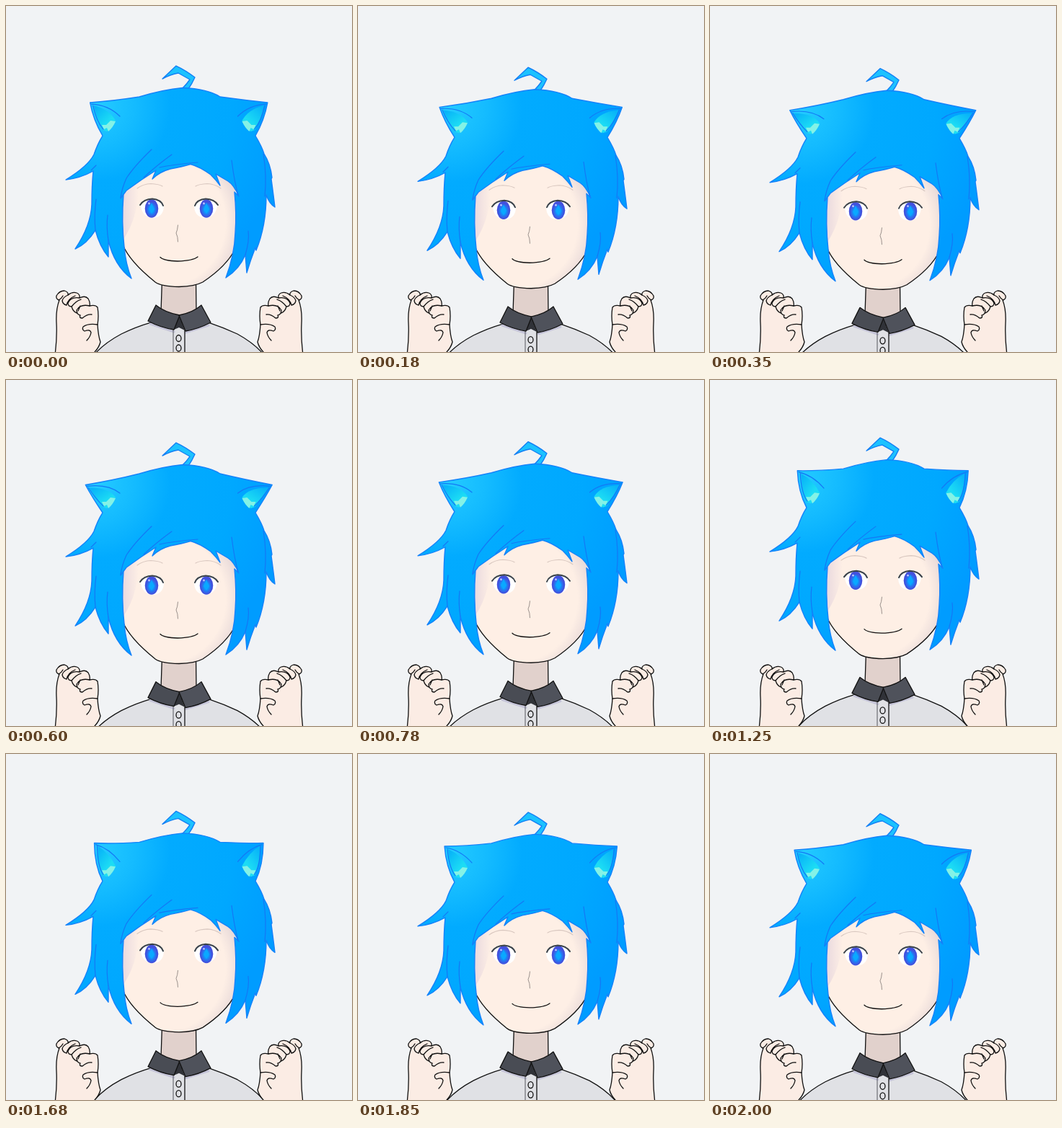
Recreate the animation shown at these times as an HTML page. Size 480 by 480 pixels, loop 2020 ms.

```html
<!DOCTYPE html>
<html>
<head>
<meta charset="utf-8">
<style>
html, body { margin: 0; width: 100%; height: 100%; overflow: hidden; background: #f1f3f5; }
svg { display: block; width: 100vw; height: 100vh; }
.ink { stroke: #111; stroke-width: 1.3; }
.strand { stroke: #1478f5; stroke-width: 1.2; }
</style>
</head>
<body>
<svg viewBox="0 0 480 480" fill="none" stroke-linecap="round" stroke-linejoin="round">
  <defs>
    <radialGradient id="hairFill" gradientUnits="userSpaceOnUse" cx="125" cy="140" r="270">
      <stop offset="0" stop-color="#24cbff"/><stop offset=".2" stop-color="#14bbff"/>
      <stop offset=".38" stop-color="#02abff"/><stop offset=".7" stop-color="#00a8ff"/><stop offset="1" stop-color="#009cff"/>
    </radialGradient>
    <radialGradient id="skin" gradientUnits="userSpaceOnUse" cx="215" cy="300" r="118">
      <stop offset=".76" stop-color="#feefe5"/><stop offset="1" stop-color="#e2d4d6"/>
    </radialGradient>
    <linearGradient id="shade">
      <stop stop-color="#eadadf"/><stop offset="1" stop-color="#feefe5"/>
    </linearGradient>
    <linearGradient id="earFill" x1="0" y1="0" x2=".8" y2="1">
      <stop offset=".1" stop-color="#08b4f8"/><stop offset=".7" stop-color="#1cdcf4"/>
    </linearGradient>
    <radialGradient id="iris" cy=".55">
      <stop offset=".3" stop-color="#0a9dff"/><stop offset=".6" stop-color="#2b70ee"/><stop offset=".85" stop-color="#4350dc"/>
    </radialGradient>
    <g id="hand" class="ink">
      <path fill="#fbece4" d="M68 484 Q71 460 70 440 Q69 421 74 408 Q69 407 70 402 Q74 395 81 395 Q87 397 86 401 Q92 396 98 398 Q103 400 102 405 Q110 401 114 406 Q117 411 116 416 Q124 414 127 418 Q129 430 127 442 Q128 458 131 466 Q129 475 119 484"/>
      <path d="M86 401 Q79 404 78 409 M73 408 Q77 406 79 402 M102 405 Q90 403 86 412 Q86 417 91 417 M78 409 Q79 414 84 415 Q86 406 96 402 M116 416 Q103 413 98 422 Q98 428 103 429 M91 417 Q93 424 98 426 M91 417 Q97 409 104 407 M103 429 Q101 433 106 433 Q113 427 119 428 M127 442 Q114 440 107 445 Q105 449 109 451 Q117 448 118 453 Q117 459 112 464 M103 416 L100 423"/>
    </g>
    <g id="eye">
      <path fill="#fff" d="M187 277 Q192 268 204 268 Q216 269 219 278 Q218 294 202 294 Q189 292 187 277"/>
      <ellipse cx="202" cy="281" rx="9.3" ry="12.8" fill="url(#iris)"/>
      <path d="M202 273 L206 282 L202 288 L198 282Z" fill="#0aa8ff"/>
      <path d="M186 276 Q191 268 203 267.500 Q215 268.500 218 277" stroke="#39424a" stroke-width="2"/>
      <path d="M182 253 Q190 247 201 246.500 Q212 247 217 250" stroke="#d9c8c0" stroke-width="1.2"/>
    </g>
    <g id="ear">
      <path class="inner" fill="url(#earFill)"/>
      <path d="M133 165 L139 165 L145 159 L152 160 Q148 169 142 174 L140 169 L136 171Z" fill="#84f2e6"/>
      <path class="strand rim"/>
    </g>
  </defs>

  <g id="body">
    <path class="ink" fill="#e0e1e5" d="M113 496 Q128 472 160 455 Q180 445 201 439 H281 Q302 446 321 455 Q352 472 367 496"/>
    <path fill="#e1d1cc" d="M216 375 L215 424 L240 432 L264 424 L264 375Z"/>
    <path class="ink" d="M216.500 380 L215 424 M263.500 380 L264 424"/>
    <path d="M200 441 L233 452 M249 453 L281 443" stroke="#c5c4d8" stroke-width="3"/>
    <path d="M232 449 V500" stroke="#55565c"/>
    <path class="ink" d="M248 450 V500"/>
    <path fill="#303238" d="M240 429 L233 449 L240 446 L248 450Z"/>
    <path class="ink" fill="#494c54" d="M208 415 L197 437 Q214 446 233 449 L241 429 Q220 425 208 415Z"/>
    <path class="ink" fill="#4f525b" d="M271 415 L284 439 Q267 448 249 451 L240 429 Q260 425 271 415Z"/>
    <g class="ink"><ellipse cx="239.500" cy="461" rx="3.500" ry="4.500"/><ellipse cx="239.500" cy="474.500" rx="3.500" ry="4.500"/></g>
  </g>

  <g id="head">
    <path fill="url(#skin)" d="M162 210 V331 Q171 354 207 383 Q215 389 240 389.500 Q262 389 273 383 Q306 361 318 337 V210Z"/>
    <path fill="url(#shade)" d="M162 240 H184 Q186 290 162 325Z"/>
    <path class="ink" d="M162 331 Q171 354 207 383 Q215 389 240 389.500 Q262 389 273 383 Q306 361 318 337"/>
    <use href="#eye"/>
    <use href="#eye" transform="matrix(-1 0 0 1 480 0)"/>
    <g fill="#b9c4ff"><circle cx="198.500" cy="274" r="1.400"/><circle cx="274.500" cy="274" r="1.400"/></g>
    <path d="M238.500 304 Q238 311 236 315 Q238.500 320 238.500 327" stroke="#9a918c"/>
    <path class="ink" d="M214 348.500 Q219 353.500 238 354 Q259 353.500 266 348"/>
    <path fill="#1cc2ff" stroke="#1480f5" stroke-width="1.400" d="M217 101 L236 83 Q249 89 262 99 Q258 108 253 115 L245 114 Q251 108 255 102 L239 93 Q228 95 217 101Z"/>
    <path id="hair" fill="url(#hairFill)" stroke="#1482fa" stroke-width="1.400"/>
    <path class="strand" d="M202 199 Q178 222 167 239 Q161 252 159 266 M230 206 Q208 222 191 238 M266 217 Q230 220 213 224 M313 214 Q317 245 322 262 M357 205 Q362 235 359 264 M124 311 Q122 290 125 268 M142 325 Q139 306 141 290 M332 345 Q338 325 336 312 M118 228 L125 221"/>
    <use href="#ear"/>
    <use href="#ear" transform="matrix(-1 0 0 1 479.500 0)"/>
  </g>

  <use href="#hand"/>
  <use href="#hand" transform="matrix(-1 0 0 1 480 0)"/>
</svg>
<script>
const PERIOD = 2020;
const find = q => document.querySelector(q);
const [body, head, hair, inner, rim] = ['#body', '#head', '#hair', '.inner', '.rim'].map(find);
const shift = (node, y) => node.setAttribute('transform', `translate(0 ${y})`);
const shape = (node, d) => node.setAttribute('d', d);

function draw(now) {
  const s = Math.sin(now % PERIOD / PERIOD * 2 * Math.PI);
  shift(body, 3.8 * s);
  shift(head, 4.2 * s);

  // Ear tips splay outward as the head sinks.
  const x = 116.7 - 6.7 * s, y = 134 + 7.8 * s, mid = 131.5 + 3.5 * s;
  const right = 479.5 - x, bend = 121 - 2 * s;
  shape(hair, `M${x} ${y} Q150 ${mid} 185 126 Q218 116 245 113.5 Q280 115 297 126
    Q330 ${mid - 1} ${right} ${y} Q${479.5 - bend} 158 346 180 Q355 195 358 205
    Q367 219 369 238 L368 240 Q371 262 373 279 Q365 274 361 262 Q361 305 347 339
    L346 335 Q339 353 334 370 L332 345 Q324 365 305 377 Q317 345 318 315 Q320 288 317 258
    L323 264 Q316 248 308 243 L291 233 L297 249 Q291 241 284 234 Q269 223 256 219.5
    Q244 223 228 226 Q213 230 203 240 L208 228 Q186 242 167 256 L159 267 L163 261
    Q160 300 164 334 Q166 358 174 378 Q150 360 142 325 V348 Q130 334 124 311
    Q112 330 96 337 Q118 304 119 275 Q119 249 121 229 Q103 239 83 241
    Q114 222 122 206 Q127 191 134 180 Q${bend} 158 ${x} ${y}Z`);
  shape(inner, `M${x + 5} ${y + 4} Q143 ${143 + 2 * s} 152 159 Q149 169 140 174 L134 172
    Q${125 - 2 * s} 157 ${x + 5} ${y + 4}Z`);
  shape(rim, `M${x + 2} ${y + 2} Q${142 - s} ${137 + 3 * s} 158 153
    M${x + 4} ${y + 4} Q${125 - 2 * s} 159 135 171`);
  requestAnimationFrame(() => draw(performance.now() - start));
}
const start = performance.now();
draw(0);
</script>
</body>
</html>
```
